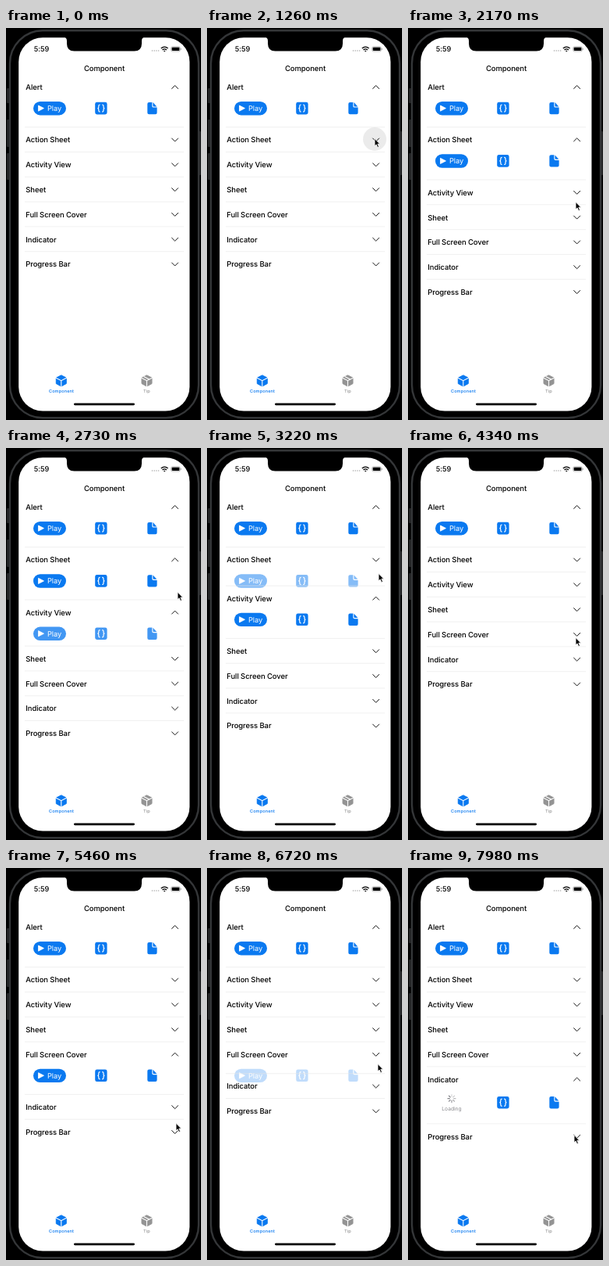
An HTML page that plays this animation: 250x501 px, repeating every 8000 ms.

```html
<!DOCTYPE html>
<html lang="en">
<head>
<meta charset="utf-8">
<title>Component list</title>
<style>
  html, body { margin: 0; width: 100%; height: 100%; overflow: hidden; background: #000; }
  svg { display: block; width: 250px; height: 501px; }
  text { font: 500 9.5px Inter, "Liberation Sans", sans-serif; letter-spacing: -.1px; text-rendering: geometricPrecision; }
  .mid { text-anchor: middle; }
  .play { font-weight: 400; font-size: 9.3px; fill: #fff; }
  .tab { font-size: 5.6px; letter-spacing: .1px; }
  .load { font-weight: 400; font-size: 6.7px; letter-spacing: 0; fill: #8a8a8e; }
</style>
</head>
<body>
<svg viewBox="0 0 250 501">
  <defs>
    <g id="play">
      <rect x="35" y="-8.6" width="42" height="17.4" rx="8.7" fill="#0a79f0"/>
      <path d="M41.5-3.6v7.2l7-3.6z" fill="#fff" stroke="#fff" stroke-width=".8" stroke-linejoin="round"/>
      <text class="play" x="53" y="3.4">Play</text>
    </g>
    <g id="files">
      <rect x="114.2" y="-7.8" width="15.4" height="15.6" rx="2.4" fill="#0a79f0"/>
      <path d="M120.6-4.6q-1.8 0-1.8 1.6v1.4q0 1.6-1.4 1.6q1.4 0 1.4 1.6v1.4q0 1.6 1.8 1.6M123.2-4.6q1.8 0 1.8 1.6v1.4q0 1.6 1.4 1.6q-1.4 0-1.4 1.6v1.4q0 1.6-1.8 1.6"
        fill="none" stroke="#fff" stroke-width="1.2"/>
      <path d="M183.3-7.7h4v5q0 1.7 1.7 1.7h4.6v6.7q0 2-2 2h-8.3q-2 0-2-2v-11.4q0-2 2-2z" fill="#0a79f0"/>
      <path d="M188.4-7.5l4.9 5.3h-3.9q-1 0-1-1z" fill="#0a79f0"/>
    </g>
    <g id="cube">
      <path d="M0-7L6.5-3.7V3.7L0 7.2L-6.5 3.7V-3.7z" fill="currentColor" stroke="currentColor" stroke-width="1" stroke-linejoin="round"/>
      <path d="M-7.2-3.7L0-.1L7.2-3.7M0 0V8" fill="none" stroke="#fff" stroke-width="1.1"/>
    </g>
  </defs>

  <rect width="250" height="501" fill="#000"/>
  <g fill="#242526">
    <rect x="1" y="77" width="4" height="19" rx="1"/>
    <rect x="1" y="117" width="4" height="35" rx="1"/>
    <rect x="1" y="160" width="4" height="34" rx="1"/>
    <rect x="246" y="132" width="4" height="56" rx="1"/>
  </g>
  <rect x="5" y="3.3" width="242" height="495" rx="42" fill="#000" stroke="#343638" stroke-width="2.4"/>
  <rect x="16.2" y="12.2" width="219.2" height="477.3" rx="31" fill="#fff"/>
  <path d="M73 11.5q5 0 5 5v3.5q0 9.5 9.5 9.5h77q9.5 0 9.5-9.5v-3.5q0-5 5-5z" fill="#000"/>

  <text class="mid" x="45.5" y="30.3" style="font-size:9.2px">5:59</text>
  <g fill="#aaa">
    <circle cx="187.5" cy="29" r=".8"/><circle cx="190.2" cy="29" r=".8"/>
    <circle cx="192.9" cy="29" r=".8"/><circle cx="195.6" cy="29" r=".8"/>
  </g>
  <g fill="none" stroke="#000" stroke-width="1.3">
    <path d="M198.8 26q4.4-3.8 8.8 0M200.5 28q2.7-2.3 5.4 0"/>
    <path d="M202.3 29.2h1.8l-.9 1z" fill="#000" stroke-width=".6"/>
  </g>
  <rect x="211.7" y="23.9" width="11.6" height="6" rx="1.7" fill="none" stroke="#999" stroke-width=".7"/>
  <rect x="212.6" y="24.8" width="9.8" height="4.2" rx=".9"/>
  <path d="M224.3 26v1.9" stroke="#999" stroke-width=".8"/>

  <text class="mid" x="126" y="55.3">Component</text>
  <g id="list"></g>

  <g color="#0a79f0" fill="#0a79f0">
    <use href="#cube" x="70.8" y="450.8"/>
    <text class="mid tab" x="71" y="465.8">Component</text>
  </g>
  <g color="#949494" fill="#949494">
    <use href="#cube" x="180.5" y="450.8"/>
    <path d="M176.6 445.5L184 449.3" stroke="#fff" stroke-width="1.1"/>
    <text class="mid tab" x="180.5" y="465.8">Tip</text>
  </g>
  <rect x="87" y="479.4" width="78" height="2.8" rx="1.4"/>

  <g id="cursor">
    <circle id="press" r="15" opacity=".08"/>
    <path d="M0-.5V8.8L2.1 6.9L3.7 10.6L5.4 9.8L3.8 6.2H6.7z" stroke="#fff" stroke-width=".8" stroke-linejoin="round"/>
  </g>
</svg>

<script>
const LOOP = 8000, DURATION = 350;
const $ = id => document.getElementById(id);

// Toggle times alternate between opening and closing.
const rows = [
  { name: "Alert", toggles: [-LOOP] },
  { name: "Action Sheet", toggles: [1365, 3045] },
  { name: "Activity View", toggles: [2490, 3960] },
  { name: "Sheet", toggles: [] },
  { name: "Full Screen Cover", toggles: [4655, 6485] },
  { name: "Indicator", toggles: [7250], loading: true },
  { name: "Progress Bar", toggles: [] }
];

// Pointer tip: time, x, y
const path = [
  [700, 218, 230], [1190, 215, 142], [1600, 215, 142], [2170, 215, 223],
  [2380, 220, 213], [2590, 220, 213], [2940, 220, 143], [3080, 220, 143],
  [3220, 220, 161], [3500, 217, 174], [3850, 214, 174], [4060, 214, 174],
  [4340, 215, 243], [4760, 215, 243], [5040, 216, 329], [5250, 216, 329],
  [5460, 218, 327], [5670, 221, 300], [5880, 221, 300], [6370, 219, 240],
  [6580, 219, 240], [6720, 219, 251], [7140, 215, 276], [7420, 215, 276],
  [7840, 213, 342], [LOOP, 213, 342]
];
const presses = [1260, 2380, 2940, 3850, 4550, 6370, 7140];

const spokes = Array.from({ length: 8 }, (_, i) =>
  `<path class="spoke" d="M0-2.6V-5" transform="translate(56 -5) rotate(${i * 45})"
    stroke="#77777c" stroke-width="1.2" stroke-linecap="round"/>`).join("");
const loader = spokes + '<text class="mid load" x="56" y="10.4">Loading</text>';

$("list").innerHTML = rows.map((r, i) => `<g>
  <g class="content" transform="translate(0 ${r.loading ? 29.6 : 27})">
    ${r.loading ? loader : '<use href="#play"/>'}<use href="#files"/>
  </g>
  ${i ? '<path d="M24-16.2H228" stroke="#e6e6e6" stroke-width=".6"/>' : ""}
  <text x="25.3" y="3.5">${r.name}</text>
  <path class="chevron" d="M212.6-1.9L216.6 2.1L220.6-1.9" fill="none" stroke="#111"
    stroke-linecap="round" stroke-linejoin="round"/>
</g>`).join("");

rows.forEach((r, i) => {
  r.el = $("list").children[i];
  r.content = r.el.querySelector(".content");
  r.chevron = r.el.querySelector(".chevron");
});
const spokeEls = document.querySelectorAll(".spoke");

const ease = p => {
  p = Math.min(1, Math.max(0, p));
  return p * p * (3 - 2 * p);
};

function drawList(t) {
  let y = 75.6;
  for (const r of rows) {
    const past = r.toggles.filter(s => s <= t);
    const open = past.length % 2 === 1;
    const p = past.length ? ease((t - past[past.length - 1]) / DURATION) : 1;
    const shown = open ? p : 1 - p;
    r.el.setAttribute("transform", `translate(0 ${y})`);
    r.content.setAttribute("opacity", shown);
    r.chevron.setAttribute("transform", `scale(1 ${open ? -1 : 1})`);
    y += 31.8 + shown * (r.loading ? 41.2 : 35.5);
  }
  const step = Math.floor(t / 125);
  spokeEls.forEach((s, i) => s.setAttribute("opacity", 1 - ((step - i + 800) % 8) * .1));
}

function drawCursor(t) {
  const next = path.findIndex(k => k[0] > t);
  $("cursor").style.display = next > 0 ? "" : "none";
  if (next < 1) return;
  const [t0, x0, y0] = path[next - 1], [t1, x1, y1] = path[next];
  const p = (t - t0) / (t1 - t0);
  $("cursor").setAttribute("transform", `translate(${x0 + (x1 - x0) * p} ${y0 + (y1 - y0) * p})`);
  $("press").style.display = presses.some(s => t >= s && t < s + 140) ? "" : "none";
}

const start = performance.now();
function frame() {
  const t = (performance.now() - start) % LOOP;
  drawList(t);
  drawCursor(t);
  requestAnimationFrame(frame);
}
frame();
</script>
</body>
</html>
```
